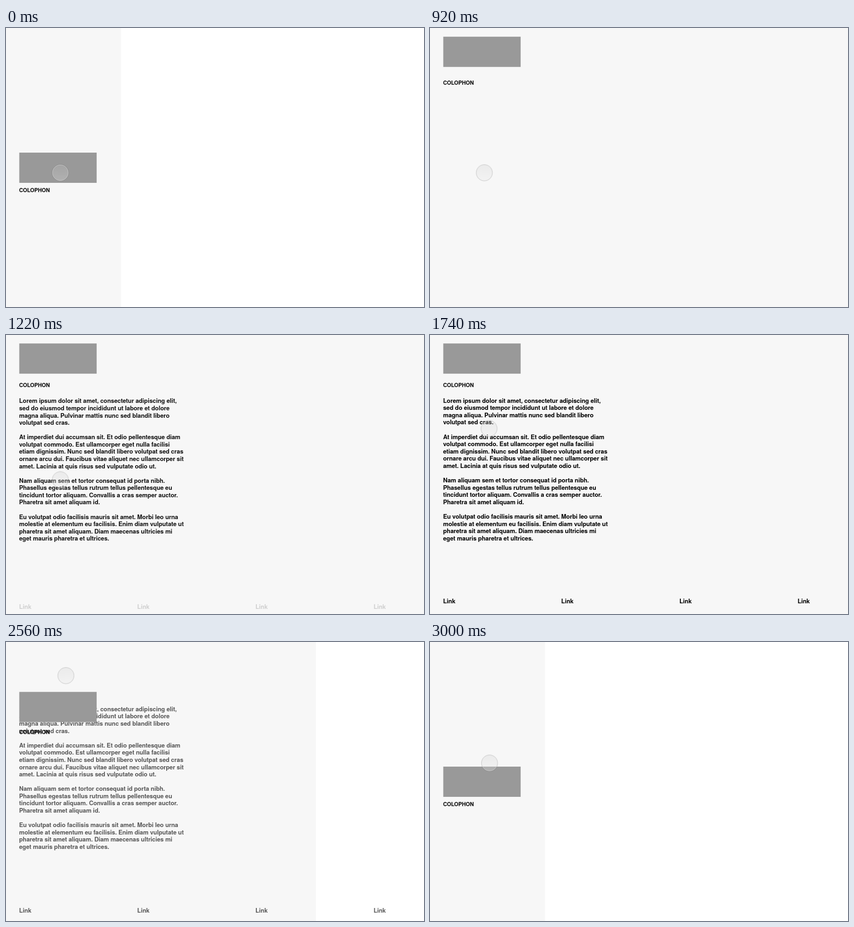
These frames come from a looping animation (900 by 600 pixels, 3.02 s). An HTML page with a canvas:

```html
<!DOCTYPE html>
<html lang="en">
<head>
<meta charset="utf-8">
<title>Colophon panel</title>
<style>
  html, body { margin: 0; width: 100%; height: 100%; overflow: hidden; background: #fff; }
  canvas { display: block; }
</style>
</head>
<body>
<canvas id="stage" width="900" height="600"></canvas>
<script>
const ctx = document.getElementById('stage').getContext('2d');
const LOOP = 3020;
const FAMILY = '"Helvetica Neue", "Liberation Sans", Arial, sans-serif';
const LEFT = 28.2;
const LINE = 15.58;
const CLOSE = 2462;

const COPY = `Lorem ipsum dolor sit amet, consectetur adipiscing elit,
sed do eiusmod tempor incididunt ut labore et dolore
magna aliqua. Pulvinar mattis nunc sed blandit libero
volutpat sed cras.

At imperdiet dui accumsan sit. Et odio pellentesque diam
volutpat commodo. Est ullamcorper eget nulla facilisi
etiam dignissim. Nunc sed blandit libero volutpat sed cras
ornare arcu dui. Faucibus vitae aliquet nec ullamcorper sit
amet. Lacinia at quis risus sed vulputate odio ut.

Nam aliquam sem et tortor consequat id porta nibh.
Phasellus egestas tellus rutrum tellus pellentesque eu
tincidunt tortor aliquam. Convallis a cras semper auctor.
Pharetra sit amet aliquam id.

Eu volutpat odio facilisis mauris sit amet. Morbi leo urna
molestie at elementum eu facilisis. Enim diam vulputate ut
pharetra sit amet aliquam. Diam maecenas ultricies mi
eget mauris pharetra et ultrices.`.split('\n');

const mix = (a, b, p) => a + (b - a) * p;
const span = (t, start, length) => Math.min(1, Math.max(0, (t - start) / length));
const easeOut = x => 1 - (1 - x) ** 2;
const easeInOut = x => x < 0.5 ? 2 * x * x : 1 - 2 * (1 - x) ** 2;

// Hand-like movement: cubic bezier (.3, .03, .12, 1)
function glide(x) {
  const curve = (s, a, b) => 3 * a * s * (1 - s) ** 2 + 3 * b * s * s * (1 - s) + s ** 3;
  let lo = 0, hi = 1;
  for (let i = 0; i < 24; i++) {
    const mid = (lo + hi) / 2;
    if (curve(mid, 0.3, 0.12) < x) lo = mid; else hi = mid;
  }
  return curve(hi, 0.03, 1);
}

// How far a part is opened: 0 closed, 1 open
function opened(t, start, length, ease) {
  return t < CLOSE
    ? ease(span(t, start, length))
    : 1 - easeOut(span(t, CLOSE, 500));
}

function write(text, x, y, size, spacing = 0) {
  ctx.font = `bold ${size}px ${FAMILY}`;
  ctx.letterSpacing = spacing + 'px';
  ctx.fillText(text, x, y);
}

function pointerAt(t) {
  const up = glide(span(t, 1535, 785));
  const down = glide(span(t, 2650, 780));
  return {
    x: mix(117, 129, 1 - (1 - up) ** 3) - down,
    y: mix(311.3, 72.3, up) + 239 * down
  };
}

function ring(x, y, radius, width, color) {
  ctx.beginPath();
  ctx.arc(x, y, radius, 0, Math.PI * 2);
  ctx.lineWidth = width;
  ctx.strokeStyle = color;
  ctx.stroke();
}

function drawPointer(t) {
  const { x, y } = pointerAt(t);
  const pressed = t >= 120 && t < 280;
  const fill = ctx.createLinearGradient(0, y - 17, 0, y + 17);
  fill.addColorStop(0, 'rgba(200,200,200,.25)');
  fill.addColorStop(1, 'rgba(233,233,233,.3)');
  ctx.beginPath();
  ctx.arc(x, y, 17, 0, Math.PI * 2);
  ctx.fillStyle = fill;
  ctx.fill();
  if (pressed) {
    ctx.fillStyle = 'rgba(0,0,0,.04)';
    ctx.fill();
  }
  ring(x, y, 17.8, 1, 'rgba(0,0,0,.12)');
  ring(x, y, 16.9, 1, 'rgba(210,210,210,.8)');
}

function draw(t) {
  const panel = opened(t, 280, 407, easeInOut);
  const block = opened(t, 437, 500, easeInOut);
  const title = opened(t, 494, 500, easeInOut);
  const copy = opened(t, 930, 400, easeOut);
  const links = opened(t, 1080, 500, easeInOut);

  ctx.fillStyle = '#fff';
  ctx.fillRect(0, 0, 900, 600);
  ctx.fillStyle = '#f7f7f7';
  ctx.fillRect(0, 0, mix(247.5, 900, panel), 600);

  ctx.fillStyle = '#000';
  ctx.globalAlpha = copy;
  const top = mix(154.7, 145.7, copy);
  COPY.forEach((line, i) => write(line, LEFT, top + i * LINE, 13, -0.105));

  ctx.globalAlpha = links;
  for (let i = 0; i < 4; i++) {
    write('Link', LEFT + i * 254.4, mix(591.6, 576.6, links), 13, -0.105);
  }

  ctx.globalAlpha = 1;
  ctx.fillStyle = '#999';
  ctx.fillRect(28.6, mix(268, 18.2, block), 166.6, 65);

  ctx.fillStyle = '#000';
  write('COLOPHON', LEFT, mix(352.7, 111.8, title), 11.5);

  drawPointer(t);
}

const began = performance.now();
function tick() {
  draw((performance.now() - began) % LOOP);
  requestAnimationFrame(tick);
}
tick();
</script>
</body>
</html>
```
